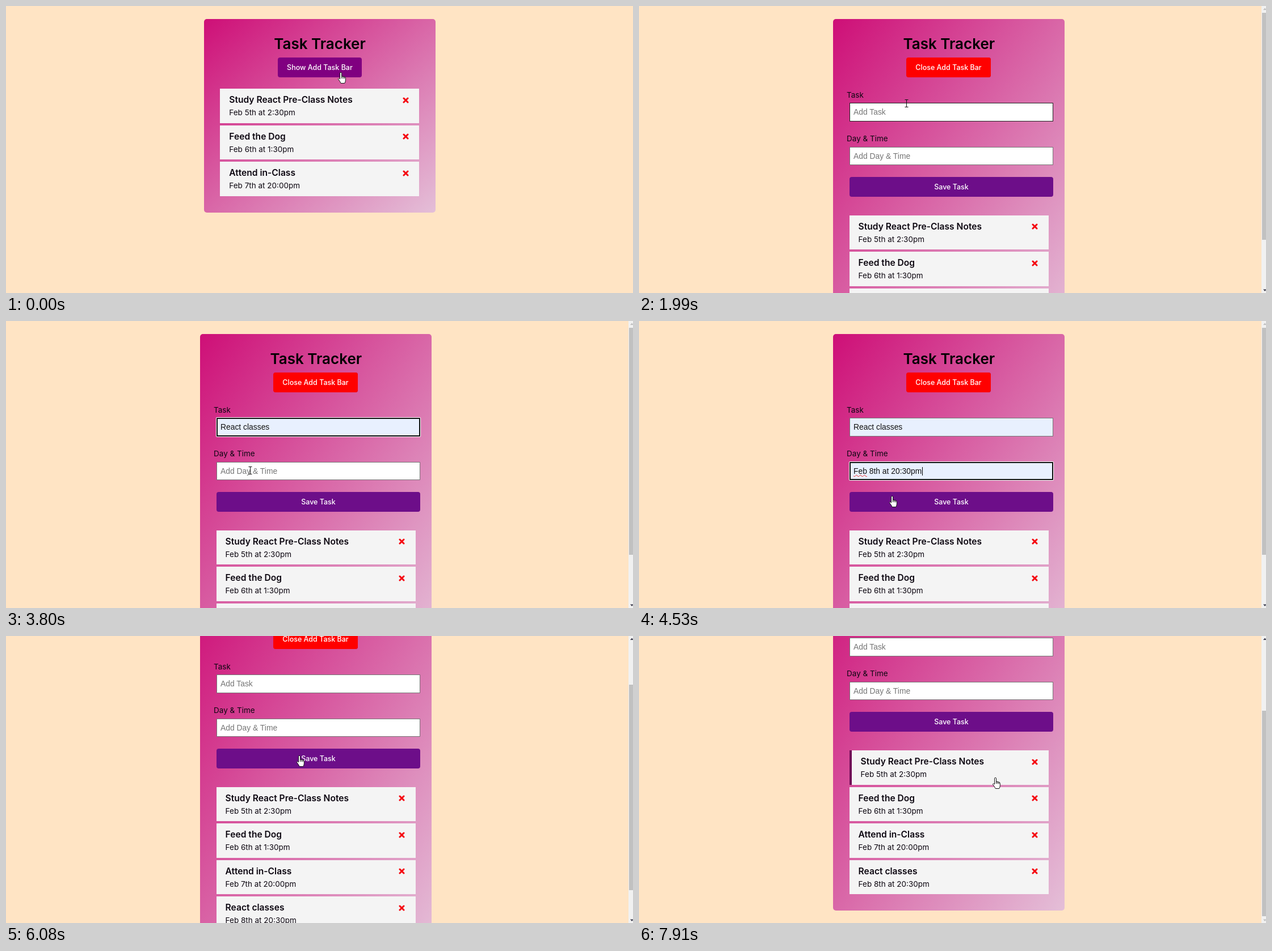
Write an HTML page that moves like this. It is 1105 by 507 pixels and loops after 8 s.

```html
<!DOCTYPE html>
<html lang="en">
<head>
<meta charset="utf-8">
<title>Task Tracker</title>
<style>
html, body { margin: 0; width: 100%; height: 100%; overflow: hidden; background: #ffe4c4; }
body { position: relative; font: 13.5px Inter, "Open Sans", sans-serif; color: #0c0610; white-space: nowrap; }
body * { position: absolute; box-sizing: border-box; animation: 8s step-end infinite; }
svg * { position: static; }
svg { overflow: visible; }

/* page and card */
#page { left: 0; top: 0; width: 1105px; height: 700px; animation-name: scroll; }
#card { left: 349px; top: 23px; width: 408px; height: 342px; border-radius: 5px;
  background: linear-gradient(to bottom right, #ce0f77, #e4bfd8); animation-name: card; }
h1 { margin: 0; left: 0; top: 24px; width: 100%; text-align: center; font-size: 26px; line-height: 40px; font-weight: 600; color: #000; }
.btn { left: 129.7px; top: 68px; width: 148.5px; height: 35px; border-radius: 4px; text-align: center;
  font-size: 12.5px; line-height: 35px; font-weight: 500; color: #fff; background: #800080; }
#close { left: 129px; width: 149px; background: #f00; }
#save { left: 29px; top: 279px; width: 359px; background: #6d0e89; }
.open { opacity: 0; animation-name: open; }
#form { left: 0; top: 0; width: 100%; }

/* fields */
.label { left: 24px; line-height: 20px; }
.field { left: 29px; width: 359px; height: 32.5px; background: #fff; border: 1px solid #767676;
  font: 13.86px/31px "Liberation Sans", Arial, sans-serif; color: #757575; }
.field > * { inset: 0; }
.field span, .fill b { left: 6px; top: 0; font-weight: 400; }
.fill { background: #e8f0fe; color: #111; opacity: 0; }
.fill b { opacity: 0; }
.fill .hint { font-size: 10.9px; color: #333a50; }
.fill u { position: static; text-decoration: underline wavy #e22 1px; text-underline-offset: 1px; }
.field .ring { inset: -1px; border: 2px solid #111; box-shadow: 0 0 0 1px #fff; border-radius: 1px; opacity: 0; }
.field .caret { left: 127px; top: 8px; width: 1px; height: 15px; background: #000; opacity: 0; animation-name: caret; }
#task { top: 148.2px; animation-name: hover; }
#day { top: 225.8px; }
#task .fill { animation-name: fill1; }
#task .hint { animation-name: hint1; }
#task .value { animation-name: value1; }
#task .ring { animation-name: ring1; }
#day .fill { animation-name: fill2; }
#day .hint { animation-name: hint2; }
#day .value { animation-name: value2; }
#day .ring { animation-name: ring2; }

/* saved data dropdown */
.drop { left: 28px; width: 327px; height: 52px; border-radius: 3px; background: #4a4a4a; color: #e4e4e4;
  box-shadow: 0 3px 9px rgba(0, 0, 0, .45); font: 8.5px/14px "Open Sans", "Noto Sans", sans-serif; opacity: 0; }
.drop > span { left: 12px; top: 3px; }
.drop > i { inset: 0; opacity: 0; }
.drop > i::before { content: ""; position: absolute; left: 3px; top: 21px; width: 292px; height: 27px; background: #737373; }
.drop svg { left: 304px; top: 28px; fill: none; stroke: #d5d5d5; }
.drop > b { left: 10.5px; top: 28px; font-size: 9px; color: #fff; }
#drop1 { top: 182px; animation-name: drop1; }
#drop2 { top: 260px; animation-name: drop2; }
#drop1 i { animation-name: hint1; }
#drop2 i { animation-name: hint2; }

/* tasks */
#list { left: 28.3px; top: 123.2px; width: 351px; animation-name: list; }
.task { left: 0; width: 100%; height: 60.5px; background: #f4f4f4; border: 0 solid #700a56; }
.task b { left: 16px; top: 10px; font-size: 15.6px; line-height: 20px; font-weight: 600; }
.task span { left: 16px; top: 32px; line-height: 20px; }
.task svg { right: 18.5px; top: 14.5px; }
.task:nth-child(2) { top: 64.5px; }
.task:nth-child(3) { top: 129px; }
.task:nth-child(4) { top: 193.5px; opacity: 0; animation-name: added; }
.task:first-child { animation-name: mark; }

/* scrollbar */
#bar { left: 1097px; top: 0; width: 8px; height: 507px; background: #f1f1f1; }
#thumb { left: 1px; top: 12px; width: 7px; height: 401px; background: #c1c1c1; animation-name: thumb; }
#bar svg { left: 0; top: 0; }
#up { fill: #c0c0c0; animation-name: up; }
#down { fill: #404050; animation-name: down; }

/* pointer */
#mouse { left: 0; top: 0; animation-name: move; }
#mouse svg { left: 0; top: 0; fill: #fff; stroke: #111; stroke-linejoin: round; }
#dot { left: -10.5px; top: -10.5px; width: 21px; height: 21px; border-radius: 50%; background: rgba(222, 212, 22, .8); opacity: 0; animation-name: click; }
#hand { animation-name: hand; }
#arrow { opacity: 0; animation-name: arrow; }
#beam { opacity: 0; animation-name: beam; }

@keyframes card {
  15.875% { left: 342.3px; height: 565px; }
  76%, to { left: 342.3px; height: 630px; }
}
@keyframes list { 15.875%, to { top: 346.7px; } }
@keyframes open { 15.875%, to { opacity: 1; } }
@keyframes added { 76%, to { opacity: 1; } }
@keyframes mark { 98.875%, to { border-left-width: 4px; } }
@keyframes scroll {
  61.875% { top: -56px; }
  62.75% { top: -77px; }
  63.625% { top: -97.6px; }
  64.5% { top: -103.1px; }
  77.75% { top: -122px; }
  78.625% { top: -151px; }
  79.5%, to { top: -167.6px; }
}
@keyframes thumb {
  61.875% { top: 56px; height: 401px; }
  62.75% { top: 73px; height: 401px; }
  63.625% { top: 89px; height: 401px; }
  64.5% { top: 93px; height: 401px; }
  76% { top: 86px; height: 363px; }
  77.75% { top: 99px; height: 363px; }
  78.625% { top: 120px; height: 363px; }
  79.5%, to { top: 132px; height: 363px; }
}
@keyframes up { 61.875%, to { fill: #404050; } }
@keyframes down { 64.5% { fill: #c0c0c0; } 76% { fill: #404050; } 79.5%, to { fill: #c0c0c0; } }
@keyframes hover { 24.875% { border-color: #222; } 31.75%, to { border-color: #767676; } }
@keyframes ring1 { 27.375% { opacity: 1; } 49%, to { opacity: 0; } }
@keyframes ring2 { 49% { opacity: 1; } 71%, to { opacity: 0; } }
@keyframes drop1 { 28.25% { opacity: 1; } 41%, to { opacity: 0; } }
@keyframes drop2 { 49.875% { opacity: 1; } 56%, to { opacity: 0; } }
@keyframes fill1 { 33.5% { opacity: 1; } 76%, to { opacity: 0; } }
@keyframes hint1 { 33.5% { opacity: 1; } 41%, to { opacity: 0; } }
@keyframes value1 { 41%, to { opacity: 1; } }
@keyframes fill2 { 52.375% { opacity: 1; } 76%, to { opacity: 0; } }
@keyframes hint2 { 52.375% { opacity: 1; } 56%, to { opacity: 0; } }
@keyframes value2 { 56%, to { opacity: 1; } }
@keyframes caret { 56% { opacity: 1; } 60.125%, to { opacity: 0; } }
@keyframes click {
  15%, 27.375%, 40.125%, 49%, 55.125%, 71%, 95.5% { opacity: 1; }
  16.625%, 28.25%, 41%, 49.875%, 56%, 76%, 98.875%, to { opacity: 0; }
}
@keyframes hand {
  0%, 56%, 65.375%, to { opacity: 1; }
  23.125%, 59.25% { opacity: 0; }
}
@keyframes arrow {
  23.125%, 31.75%, 52.375%, 59.25% { opacity: 1; }
  24.875%, 44.5%, 56%, 65.375%, to { opacity: 0; }
}
@keyframes beam {
  24.875%, 44.5% { opacity: 1; }
  31.75%, 52.375%, to { opacity: 0; }
}
@keyframes move {
  0% { transform: translate(590px, 117px); }
  .75% { transform: translate(590px, 117px); animation-timing-function: steps(2, jump-both); }
  2.5% { transform: translate(542px, 107px); }
  22.25% { transform: translate(542px, 107px); animation-timing-function: steps(3, jump-both); }
  24.875% { transform: translate(471px, 172px); }
  30.875% { transform: translate(471px, 172px); animation-timing-function: steps(5, jump-both); }
  35.125% { transform: translate(415px, 246px); }
  41.875% { transform: translate(415px, 246px); animation-timing-function: steps(5, jump-both); }
  46.25% { transform: translate(430px, 264px); }
  50.75% { transform: translate(430px, 264px); animation-timing-function: steps(3, jump-both); }
  53.25% { transform: translate(446px, 309px); }
  57.5% { transform: translate(446px, 309px); animation-timing-function: steps(3, jump-both); }
  60.125% { transform: translate(476px, 297px); }
  65.375% { transform: translate(476px, 297px); animation-timing-function: steps(5, jump-both); }
  70.125% { transform: translate(517px, 211px); }
  81% { transform: translate(517px, 211px); animation-timing-function: steps(5, jump-both); }
  85.375% { transform: translate(538px, 430px); }
  86.25% { transform: translate(538px, 430px); animation-timing-function: steps(4, jump-both); }
  90.25% { transform: translate(678px, 222px); animation-timing-function: steps(2); }
  92.25%, to { transform: translate(628px, 250px); }
}
</style>
</head>
<body>
<svg width="0" height="0">
  <symbol id="x" viewBox="0 0 11 11"><path d="M2 2 9 9M9 2 2 9" stroke="#f5060f" stroke-width="3" stroke-linecap="round"/></symbol>
  <symbol id="bin" viewBox="0 0 12 14"><path d="M.5 2.5h11M4 2.5q0-2 2-2t2 2M1.7 2.5l.9 10.9h6.8l.9-10.9M4.6 5v6M7.4 5v6"/></symbol>
</svg>

<div id="page">
  <div id="card">
    <h1>Task Tracker</h1>
    <div class="btn">Show Add Task Bar</div>
    <div class="btn open" id="close">Close Add Task Bar</div>
    <div id="list">
      <div class="task"><b>Study React Pre-Class Notes</b><span>Feb 5th at 2:30pm</span><svg width="11" height="11"><use href="#x"/></svg></div>
      <div class="task"><b>Feed the Dog</b><span>Feb 6th at 1:30pm</span><svg width="11" height="11"><use href="#x"/></svg></div>
      <div class="task"><b>Attend in-Class</b><span>Feb 7th at 20:00pm</span><svg width="11" height="11"><use href="#x"/></svg></div>
      <div class="task"><b>React classes</b><span>Feb 8th at 20:30pm</span><svg width="11" height="11"><use href="#x"/></svg></div>
    </div>
    <div id="form" class="open">
      <div class="label" style="top:123.5px">Task</div>
      <div class="field" id="task">
        <span>Add Task</span>
        <div class="fill"><b class="hint">React classes</b><b class="value">React classes</b></div>
        <div class="ring"></div>
      </div>
      <div class="label" style="top:201px">Day &amp; Time</div>
      <div class="field" id="day">
        <span>Add Day &amp; Time</span>
        <div class="fill"><b class="hint">Feb 8th at 20:30pm</b><b class="value"><u>Feb</u> 8th at 20:30pm</b><div class="caret"></div></div>
        <div class="ring"></div>
      </div>
      <div class="btn" id="save">Save Task</div>
      <div class="drop" id="drop1">
        <span>Kaydedilmiş veriler</span>
        <i><svg width="12" height="14"><use href="#bin"/></svg></i>
        <b>React classes</b>
      </div>
      <div class="drop" id="drop2">
        <span>Kaydedilmiş veriler</span>
        <i><svg width="12" height="14"><use href="#bin"/></svg></i>
        <b>Feb 8th at 20:30pm</b>
      </div>
    </div>
  </div>
</div>

<div id="bar" class="open">
  <div id="thumb"></div>
  <svg width="8" height="507"><path id="up" d="M3 7h6L6 3.5Z"/><path id="down" d="M3 500.5h6L6 504Z"/></svg>
</div>

<div id="mouse">
  <div id="dot"></div>
  <svg id="hand" width="1" height="1"><path transform="translate(-5)" d="M3.6 12V1.8a1.5 1.5 0 0 1 3 0V7l5 1.2q1.8.5 1.8 2.3v3.2q0 3-1.6 5.8H5.2Q4 16.5.8 12.6q-.7-1.2.5-1.8 1-.4 2.3 1.2ZM6.6 7v4M9 7.8v3.4M11.3 8.4v3"/></svg>
  <svg id="arrow" width="1" height="1"><path d="M.5.5V14l3.2-2.9 2.1 4.9 2.1-1-2.1-4.7H10Z"/></svg>
  <svg id="beam" width="1" height="1"><path fill="none" d="M-2.5-6.5h6M.5-6.5v13M-2.5 6.5h6"/></svg>
</div>
</body>
</html>
```
